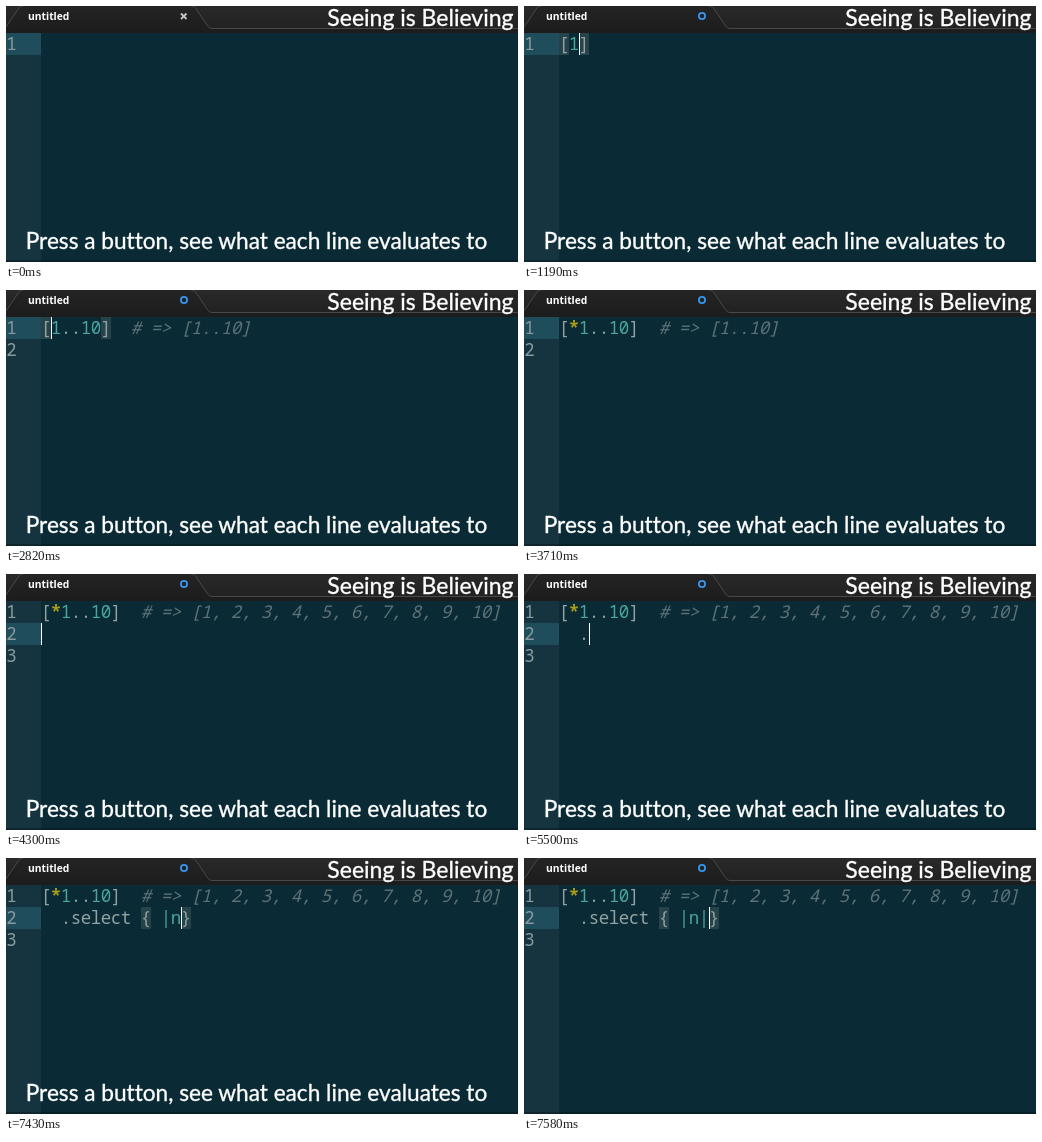
These frames come from a looping animation (512 by 256 pixels, 8 s). An HTML page:

```html
<!DOCTYPE html>
<html lang="en">
<head>
<meta charset="utf-8">
<title>Seeing is Believing</title>
<style>
  html, body { margin: 0; width: 100%; height: 100%; overflow: hidden; background: #0a2b35; }
  svg { display: block; width: 512px; height: 256px; }
  text { white-space: pre; }
  .code { font: 500 17.5px "Noto Sans Mono", "DejaVu Sans Mono", monospace; text-anchor: middle; fill: #92a1a2; }
  .code .value { fill: #4aa69c; }
  .code .splat { fill: #aa9f1b; font-weight: 700; }
  .note { font-style: italic; fill: #5d7177; }
  .number { fill: #8a9a9c; }
  .match { fill: #27434a; }
  .caption {
    font: 22.65px Lato, "Open Sans", sans-serif; font-variant-ligatures: none;
    fill: #fff; stroke: #fff; stroke-width: 0.35;
  }
  .name { font: 700 10.3px "Open Sans", "DejaVu Sans", sans-serif; fill: #fff; }
</style>
</head>
<body>
<svg viewBox="0 0 512 256">
  <defs>
    <linearGradient id="bar" x2="0" y2="1">
      <stop stop-color="#292929"/><stop offset="1" stop-color="#202020"/>
    </linearGradient>
    <linearGradient id="tab" x2="0" y2="1">
      <stop stop-color="#242424"/><stop offset="1" stop-color="#1c1c1c"/>
    </linearGradient>
  </defs>
  <rect width="512" height="256" fill="#0a2b35"/>
  <rect y="27" width="35" height="229" fill="#15343f"/>
  <g id="editor"></g>
  <rect y="254" width="512" height="2" fill-opacity="0.27"/>

  <rect width="512" height="27" fill="url(#bar)"/>
  <path d="M0 21L13 2Q14 0 17 0H185Q188 0 189.5 2L202 20.5Q203.5 22.5 206 22.5H512V27H0Z" fill="url(#tab)"/>
  <path d="M0 21L13 2Q14 0 17 0M185 0Q188 0 189.5 2L202 20.5Q203.5 22.5 206 22.5H512" fill="none" stroke="#484848"/>
  <text class="name" x="22" y="14">untitled</text>
  <path id="close" d="M175 7.5l5.5 5.5m0-5.5l-5.5 5.5" stroke="#c4c4c4" stroke-width="1.8"/>
  <circle id="dirty" cx="178" cy="10" r="3.1" fill="none" stroke="#3795f0" stroke-width="1.8"/>

  <text class="caption" x="507.5" y="20" text-anchor="end" style="font-size:23px">Seeing is Believing</text>
  <text class="caption" id="caption" x="250.5" y="243" text-anchor="middle">Press a button, see what each line evaluates to</text>
</svg>
<script>
const LOOP = 8000, LEFT = 35, TOP = 27, CELL = 10, ROW = 22;
const RANGE = '[1..10]', SPLAT = '[*1..10]';
const SHORT = '# => [1..10]', LONG = '# => [1, 2, 3, 4, 5, 6, 7, 8, 9, 10]';

// time, first line, its result, second line (null before it is opened), caret column, caret visible
const steps = [
  [0, '', '', null, 0, false],
  [300, '', '', null, 0, true],
  [590, '[]', '', null, 1, true],
  [1190, '[1]', '', null, 2, true],
  [1340, '[1.]', '', null, 3, true],
  [1480, '[1..]', '', null, 4, true],
  [1630, '[1..1]', '', null, 5, true],
  [1780, RANGE, '', null, 6, true],
  [2230, RANGE, '', null, 6, false],
  [2520, RANGE, SHORT, null, 0, true],
  [2820, RANGE, SHORT, null, 1, true],
  [3270, SPLAT, SHORT, null, 2, true],
  [3710, SPLAT, SHORT, null, 2, false],
  [4160, SPLAT, LONG, null, 0, true]
];
const typed = (time, text, col = text.length, caret = true) =>
  steps.push([time, SPLAT, LONG, text, col, caret]);
typed(4300, '');
typed(4600, ' ');
typed(4750, '  ');
typed(4900, '  .');
typed(5200, '  .m');
typed(5500, '  .');
typed(5940, '  .', 3, false);
typed(6240, '  .s');
typed(6390, '  .sel');
typed(6540, '  .sele');
typed(6690, '  .select');
typed(6830, '  .select ');
typed(6980, '  .select {}', 11);
typed(7130, '  .select { |}', 13);
typed(7430, '  .select { |n}', 14);
typed(7580, '  .select { |n|}', 15);

const $ = id => document.getElementById(id);
const show = (id, on) => $(id).setAttribute('visibility', on ? 'visible' : 'hidden');
const rect = (x, row, w, attrs) =>
  `<rect x="${x}" y="${TOP + row * ROW}" width="${w}" height="${ROW}" ${attrs}/>`;

function kind(text, i) {
  if (text[i] === '*') return 'splat';
  const inBlock = text.includes('{') && i > text.indexOf('{');
  return /\d/.test(text[i]) || (inBlock && /[|n]/.test(text[i])) ? 'value' : '';
}

// One glyph per grid cell
function line(text, row, col, style) {
  const y = TOP + row * ROW + 17;
  return [...text].map((ch, i) => ch === ' ' ? '' :
    `<tspan x="${LEFT + (col + i + 0.5) * CELL}" y="${y}" class="${style || kind(text, i)}">${ch === '>' ? '&gt;' : ch}</tspan>`
  ).join('');
}

// Brackets light up when the caret touches one of them
function matches(text, row, col) {
  const bracket = /[[\]{}]/;
  if (!bracket.test(text.slice(Math.max(0, col - 1), col + 1))) return '';
  return [...text].map((ch, i) =>
    bracket.test(ch) ? rect(LEFT + i * CELL, row, CELL, 'class="match"') : '').join('');
}

function draw([, first, result, second, col, caret]) {
  const row = second === null ? 0 : 1;
  const count = row ? 3 : result ? 2 : 1;
  const numbers = Array.from({ length: count }, (_, i) => line(String(i + 1), i, -3.45, 'number'));
  $('editor').innerHTML =
    rect(0, row, LEFT, 'fill="#1f4d5c"') +
    matches(row ? second : first, row, col) +
    '<text class="code">' + numbers.join('') + line(first, 0, 0) +
    line(result, 0, first.length + 2, 'note') + line(second || '', 1, 0) + '</text>' +
    (caret ? rect(LEFT + col * CELL, row, 1, 'fill="#fff"') : '');
}

let start, current;
function frame(now) {
  start ??= now;
  const time = (now - start) % LOOP;
  const step = steps.findLast(s => s[0] <= time);
  if (step !== current) draw(current = step);
  show('close', time < 890);
  show('dirty', time >= 890);
  show('caption', time < 7580);
  requestAnimationFrame(frame);
}
draw(current = steps[0]);
show('dirty', false);
requestAnimationFrame(frame);
</script>
</body>
</html>
```
